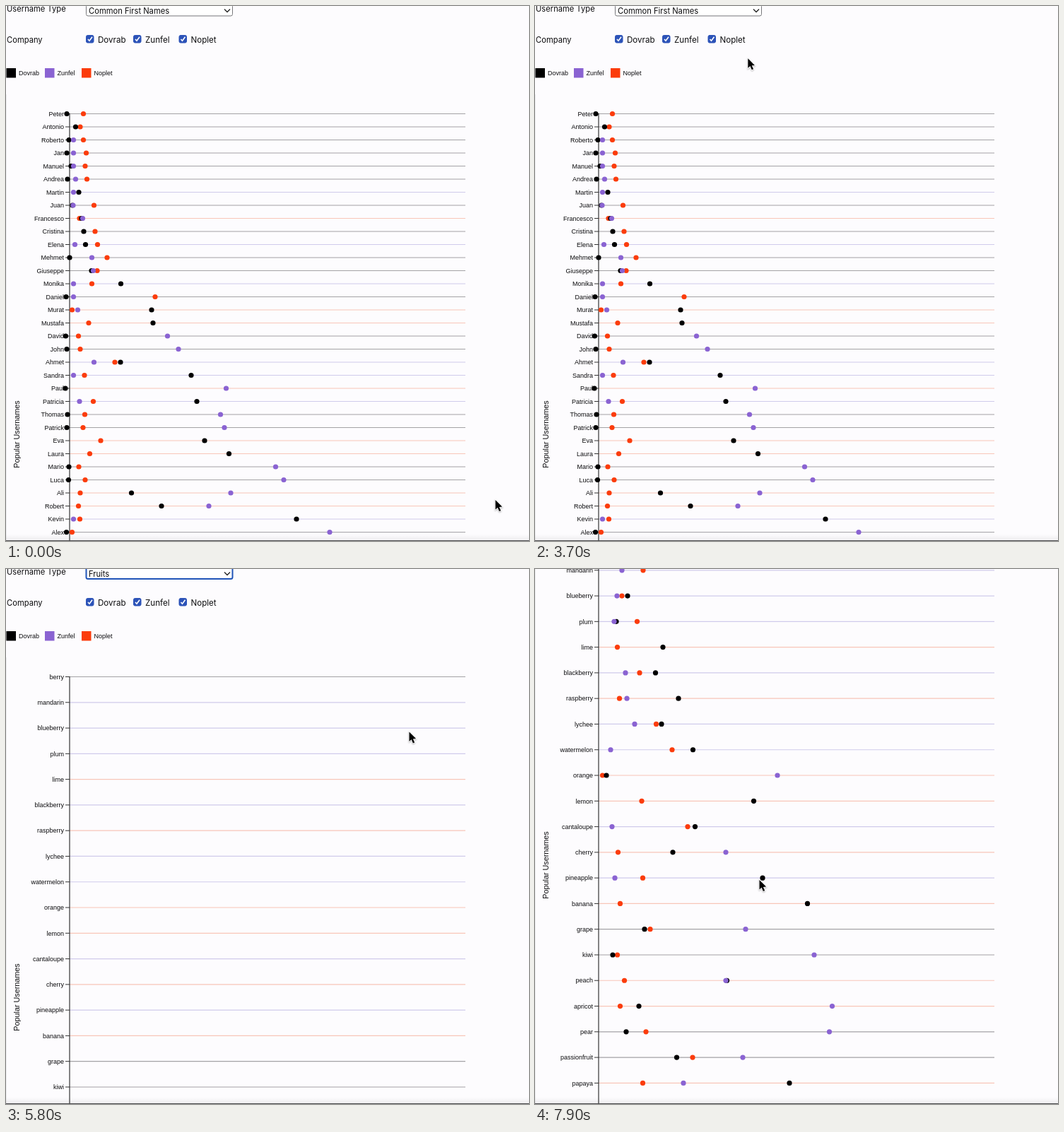
Write an HTML page with a canvas that moves like this. It is 740 px wide and 757 px high and loops after 8000 ms.

```html
<!DOCTYPE html>
<html lang="en">
<head>
<meta charset="utf-8">
<style>
html, body { margin: 0; width: 100%; height: 100%; overflow: hidden; background: #fdfcfe; }
canvas { display: block; }
</style>
</head>
<body>
<canvas id="stage" width="740" height="757"></canvas>
<script>
const c = document.getElementById('stage').getContext('2d');
const LOOP = 8000, TOP = 152.5, AXIS = 90, RIGHT = 650;
const UI = 'Inter, sans-serif', CHART = '"Liberation Sans", Arial, sans-serif';

const sites = {
  k: { name: 'Dovrab', color: '#000', line: '#a3a2a5', box: 113, key: 0.5 },
  p: { name: 'Zunfel', color: '#8a63d2', line: '#d0cbeb', box: 180, key: 55 },
  r: { name: 'Noplet', color: '#fb3c0c', line: '#f8c6b8', box: 244.5, key: 107 }
};

// Each row: label, then site letter and x position of every dot.
const parse = text => text.trim().split(/\s*;\s*/).map(row => {
  const [label, ...dots] = row.split(' ');
  const at = {};
  dots.forEach(d => at[d[0]] = +d.slice(1));
  const first = Object.keys(at).sort((a, b) => at[a] - at[b])[0];
  return { label, at, first };
});

const people = parse(`Peter k86 r109.5; Antonio k98.5 r105; Roberto k89 p95.5 r109.5;
  Jan k86 p95.5 r113.5; Manuel k92 p95.5 r112; Andrea k87 p98.5 r114.5; Martin p95.5 k103;
  Juan k94 p95 r124.5; Francesco r104 k107 p108.5; Cristina k110 r126; Elena p97.5 k112.5 r129.5;
  Mehmet k90 p121.5 r143; Giuseppe k121 p123.5 r129; Monika p95.5 r121.5 k162.5;
  Daniel k85 p95.5 r211; Murat r93.5 p101.5 k206; Mustafa r117 k208; David k84.5 p228.5 r102.5;
  John k86 p244 r105; Ahmet p124.5 r154 k162; Sandra p95.5 r111 k262; Paul k84 p311.5;
  Patricia p104 r123.5 k270; Thomas k87 p303.5 r111.5; Patrick k86 p309 r109; Eva r134 k281;
  Laura r118.5 k315.5; Mario k89 p381.5 r103; Luca k88.5 p393 r112; Ali r105 k177.5 p318;
  Robert r102.5 k220 p287; Kevin p95.5 r104.5 k411; Alex k85.5 p458 r93.5`);
people.find(row => row.label === 'Paul').first = 'r';

const fruits = parse(`berry k86 r120.5; mandarin p123 r153; blueberry p116 r123 k131;
  plum p112 k115 r144.5; lime r116.5 k181; blackberry p128 r148 k170.5; raspberry r119.5 p130 k203;
  lychee p141 r171.5 k179; watermelon p107 r194 k223.5; orange r95.5 k101 p343; lemon r151 k309.5;
  cantaloupe p109 r216 k226.5; cherry r117.5 k195 p270; pineapple p113 r152.5 k322;
  banana r120.5 k385.5; grape k155 r163 p298; kiwi k110 r116.5 p395; peach r126.5 k271.5 p270;
  apricot r120.5 k147 p420.5; pear k129 r157 p416.5; passionfruit k200.5 r223 p294;
  papaya r152.5 p210 k360`);

// Pointer stops: time, x, y
const path = [
  [0, 692.5, 699], [550, 692.5, 699], [1300, 237.5, 55], [1400, 187, 46], [2050, 187, 46],
  [2350, 248, 44], [3500, 248, 44], [4100, 452, 160], [4250, 500, 184], [4500, 410.5, 166.5],
  [4850, 250, 6], [5350, 250, 6], [5800, 570.5, 230.5], [6050, 570.5, 230.5], [6750, 497.5, 327.5],
  [6950, 497.5, 327.5], [7700, 317, 447], [7900, 317.5, 440]
];

const ease = (t, a, b) => {
  const u = Math.min(1, Math.max(0, (t - a) / (b - a)));
  return u * u * (3 - 2 * u);
};

function pointerAt(t) {
  const i = path.findIndex(p => p[0] > t);
  if (i < 0) return path[path.length - 1].slice(1);
  const [t0, x0, y0] = path[i - 1], [t1, x1, y1] = path[i];
  const u = ease(t, t0, t1);
  return [x0 + (x1 - x0) * u, y0 + (y1 - y0) * u];
}

function text(s, x, y, size, family, align = 'left') {
  c.font = `${size}px ${family}`;
  c.textAlign = align;
  c.fillStyle = '#0c0c0e';
  c.fillText(s, x, y);
}

function stroke(points, color, width = 1) {
  c.strokeStyle = color;
  c.lineWidth = width;
  c.beginPath();
  points.forEach(p => c.lineTo(...p));
  c.stroke();
}

function roundBox(x, y, w, h, r, fill, border, width = 1) {
  c.beginPath();
  c.roundRect(x, y, w, h, r);
  c.fillStyle = fill;
  c.fill();
  c.strokeStyle = border;
  c.lineWidth = width;
  c.stroke();
}

function drawControls(choice, focused, checked) {
  text('Username Type', 1, 8, 11.2, UI);
  roundBox(113.5, -2, 207, 16, 2.5, '#fff', focused ? '#2054b8' : '#77777b', focused ? 2 : 1);
  text(choice, 117, 10.5, 11.2, UI);
  stroke([[309, 4.5], [313, 8.5], [317, 4.5]], '#222', 1.3);

  text('Company', 1, 52, 11.2, UI);
  for (const id in sites) {
    const { name, color, box, key } = sites[id];
    if (checked[id]) {
      roundBox(box + 0.5, 41.5, 10.5, 10.5, 2, '#2c53b8', '#2c53b8');
      stroke([[box + 3, 47], [box + 5, 49.3], [box + 9, 43.8]], '#fff', 1.6);
    } else {
      roundBox(box + 0.5, 41.5, 10.5, 10.5, 2, '#fff', '#77777b');
    }
    text(name, box + 17, 52, 11.6, UI);
    c.fillStyle = color;
    c.fillRect(key, 88, 13.5, 13.5);
    text(name, key + 17.5, 98, 9, CHART);
  }
}

function drawChart(rows, step, checked, opacity) {
  c.fillStyle = '#ececef';
  c.fillRect(0, 125, 1, 900);
  c.save();
  c.translate(18.5, 606);
  c.rotate(-Math.PI / 2);
  text('Popular Usernames', 0, 0, 10.8, CHART, 'center');
  c.restore();

  rows.forEach((row, i) => {
    const y = TOP + i * step;
    stroke([[AXIS, y], [RIGHT, y]], sites[row.first].line, 1.2);
    stroke([[84, y], [AXIS, y]], '#333');
    text(row.label, 82, y + 3.2, 9, CHART, 'right');
  });
  stroke([[AXIS, TOP - 0.5], [AXIS, 1000]], '#333', 1.2);

  c.globalAlpha = opacity;
  rows.forEach((row, i) => {
    for (const id of 'rkp') {
      if (!(id in row.at) || !checked[id]) continue;
      c.fillStyle = sites[id].color;
      c.beginPath();
      c.arc(row.at[id], TOP + i * step, 3.6, 0, 7);
      c.fill();
    }
  });
  c.globalAlpha = 1;
}

function drawPointer(x, y) {
  c.save();
  c.translate(x, y);
  c.shadowColor = 'rgba(0,0,0,.3)';
  c.shadowBlur = 2;
  c.shadowOffsetY = 1;
  c.beginPath();
  [[0, 0], [0, 13.5], [3.1, 10.7], [5.4, 16], [7.7, 15], [5.4, 9.9], [9.6, 9.6]]
    .forEach(p => c.lineTo(...p));
  c.closePath();
  c.lineWidth = 1.6;
  c.strokeStyle = '#fff';
  c.stroke();
  c.shadowColor = 'transparent';
  c.fillStyle = '#000';
  c.fill();
  c.restore();
}

function draw(t) {
  const isFruit = t >= 5400;
  const checked = { k: true, p: t < 1400 || t >= 1900, r: t < 2500 || t >= 3400 };

  c.fillStyle = '#fdfcfe';
  c.fillRect(0, 0, 740, 757);
  c.save();
  c.translate(0, -187 * ease(t, 6750, 7700));
  drawControls(isFruit ? 'Fruits' : 'Common First Names', t >= 4900, checked);
  if (isFruit) drawChart(fruits, 36.28, checked, ease(t, 5900, 6400));
  else drawChart(people, 18.5, checked, 1);
  c.restore();

  const shade = c.createLinearGradient(0, 747, 0, 756);
  shade.addColorStop(0, 'rgba(0,0,0,0)');
  shade.addColorStop(1, 'rgba(0,0,0,.06)');
  c.fillStyle = shade;
  c.fillRect(0, 747, 740, 9);
  c.fillStyle = '#4a4a4c';
  c.fillRect(0, 756, 740, 1);
  drawPointer(...pointerAt(t));
}

function tick() {
  draw(performance.now() % LOOP);
  requestAnimationFrame(tick);
}
tick();
</script>
</body>
</html>
```
